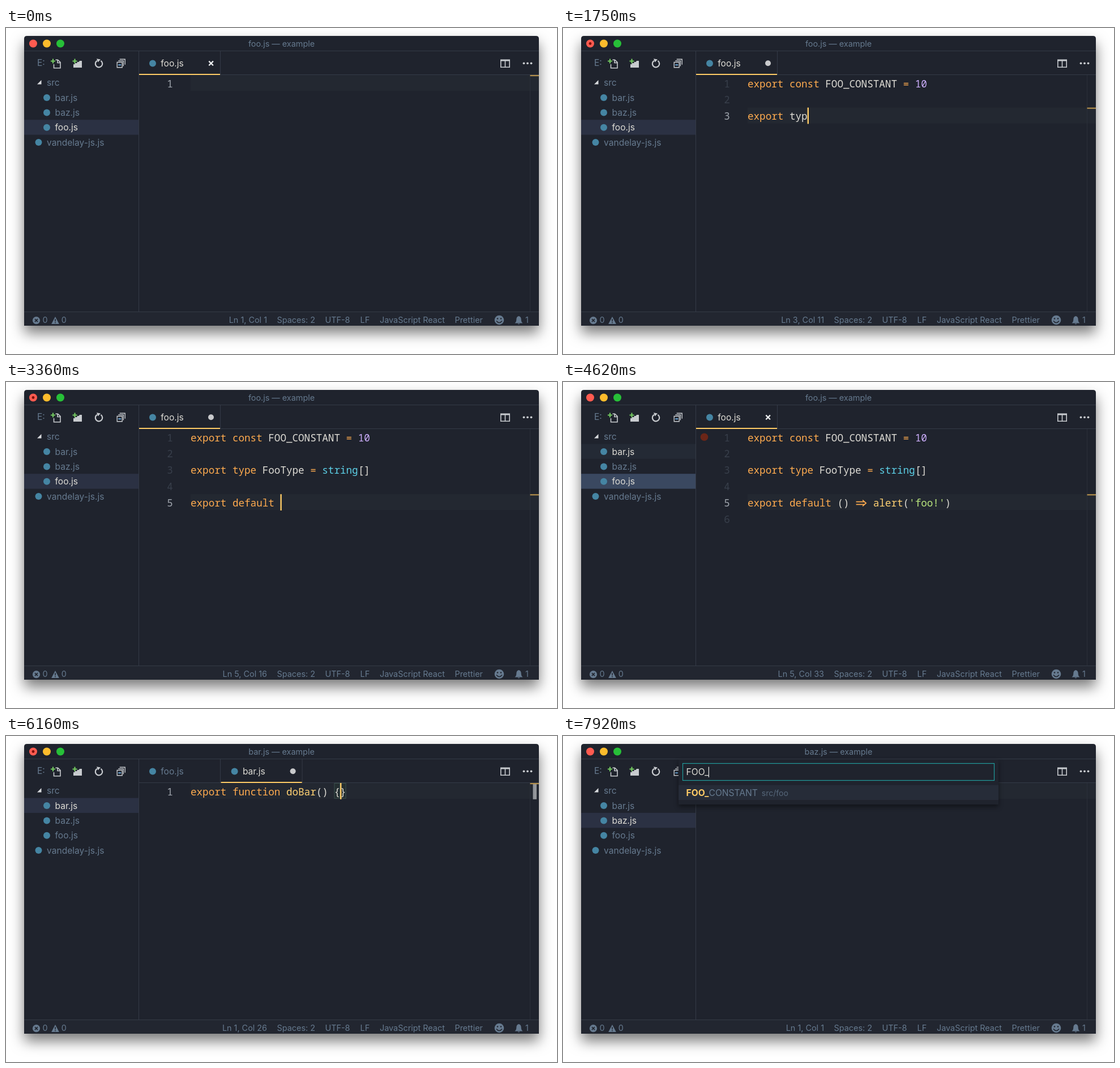
Recreate the animation shown at these times as an HTML page. Size 973 px wide and 576 px high, loop 7.99 s.

```html
<!DOCTYPE html>
<html lang="en">
<head>
<meta charset="utf-8">
<title>Editor demo</title>
<style>
  html, body { margin: 0; width: 100%; height: 100%; overflow: hidden; background: #fff; }
  svg { display: block; width: 973px; height: 576px; }
  text { font-family: Inter, "Open Sans", sans-serif; font-size: 15.6px; fill: #667a8f; white-space: pre; }
  .small { font-size: 14.4px; }
  .code { font-family: "Noto Sans Mono", "DejaVu Sans Mono", monospace; font-size: 17.6px; font-weight: 500; }
  .shadow { filter: drop-shadow(0 13px 12px rgba(0, 0, 0, .52)); }
</style>
</head>
<body>
<svg viewBox="0 0 973 576">
  <path class="shadow" d="M32 526V19q0-5 5-5H936q5 0 5 5V526z" fill="#1f232d"/>
  <g id="under"></g>
  <g id="frame"></g>
  <g id="live"></g>
</svg>
<script>
const LOOP = 7990, STEP = 70;
const CODE_X = 326, CHAR_W = 10.56, TOP = 83, LINE_H = 28.8;
const C = {
  bg: '#1f232d', dim: '#667a8f', bright: '#dedcd5', edge: '#343a46', gold: '#ffcc66',
  keyword: '#ffab4f', number: '#cfb0ff', type: '#5ccfe6', string: '#bae67e', call: '#ffd173',
  icon: '#c8cbcf', mark: '#4585a3', row: '#2b3143', focus: '#3a4860', hover: '#242a35'
};
const FOO = `export const FOO_CONSTANT = 10

export type FooType = string[]

export default () => alert('foo!`;
const BAR = 'export function doBar() {';

// [time, characters typed so far]
const FOO_KEYS = [[210, 0], [1050, 25], [2450, 59], [2730, 62], [3360, 79], [4060, FOO.length]];
const BAR_KEYS = [[5110, 0], [6160, BAR.length]];
const SAVE_FOO = 4270, OPEN_BAR = 4690, ENTER = 6300, SAVE_BAR = 6870, OPEN_BAZ = 7150, PICK = 7500;

const EXPORTS = [['doBar', 'src/bar'], ['foo', 'src/foo'], ['FOO_CONSTANT', 'src/foo'], ['FooType', 'src/foo']];

const el = id => document.getElementById(id);
const esc = s => s.replace(/&/g, '&amp;').replace(/</g, '&lt;').replace(/>/g, '&gt;');
const rect = (x, y, w, h, fill, more = '') =>
  `<rect x="${x}" y="${y}" width="${w}" height="${h}" fill="${fill}" ${more}/>`;
const dot = (x, y, r, fill) => `<circle cx="${x}" cy="${y}" r="${r}" fill="${fill}"/>`;
const line = (d, stroke, w = 1, more = '') =>
  `<path d="${d}" fill="none" stroke="${stroke}" stroke-width="${w}" ${more}/>`;
const shape = (d, fill, more = '') => `<path d="${d}" fill="${fill}" ${more}/>`;
const text = (x, y, s, fill = C.dim, more = '') =>
  `<text x="${x}" y="${y}" style="fill:${fill}" ${more}>${esc(s)}</text>`;
const small = (x, y, s, anchor = 'start') =>
  text(x, y, s, C.dim, `class="small" text-anchor="${anchor}"`);

function chrome() {
  const plus = x => line(`M${x - 4} 58.5h8m-4 -4v8`, '#73c960', 2.2);
  return [
    line('M32 40.5H941M234.5 41V501', C.edge),
    rect(32, 501.5, 909, 24.5, '#222630'),
    line('M32 501.5H941', C.edge),
    dot(48, 27.5, 7, '#ff5b50'), dot(72, 27.5, 7, '#fdbc2c'), dot(96, 27.5, 7, '#27c038'),
    // explorer actions
    text(55, 67, 'E:', C.dim, 'style="font-size:13px"'),
    line('M84.5 64v6.7h11.5v-10l-4.5 -4.5h-4M91 56.5v5h5', C.icon, 1.6), plus(83),
    shape('M119 64h2.5v-2h4v-2h3l1.5-2h4v12h-15z', C.icon), plus(121.5),
    line('M161 57.7a6.2 6.2 0 1 0 6.4 .2', C.icon, 2.2),
    shape('M160 54.2l7 1.2 -4.5 5.2z', C.icon),
    line('M196.2 60.5h9v9.3h-9zM198.3 58h9v9.5M200.7 55.3h9.5v9.5', C.icon, 1.4),
    line('M198.2 65.2h5', '#76b8ee', 1.8),
    // editor actions
    line('M873.8 57h15.4v12.3h-15.4zM881.5 57v12', C.icon, 1.6), rect(873, 55.5, 17, 3, C.icon),
    [914.5, 921, 927.5].map(x => dot(x, 62.3, 1.9, C.icon)).join(''),
    // status bar
    dot(53.5, 516.7, 6.6, C.dim), line('M51 514.2l5 5m0 -5l-5 5', '#222630', 1.7), small(64.5, 521.2, '0'),
    shape('M87 510l6.8 13H80.2z', C.dim), line('M87 514v4.5m0 1.3v1.7', '#222630', 1.6),
    small(97.7, 521.2, '0'),
    small(478.5, 521.2, 'Spaces: 2'), small(563.5, 521.2, 'UTF-8'), small(625.5, 521.2, 'LF'),
    small(660, 521.2, 'JavaScript React'), small(792.5, 521.2, 'Prettier'),
    dot(871, 516, 8.3, C.dim), dot(868, 513.5, 1.3, '#222630'), dot(874, 513.5, 1.3, '#222630'),
    line('M866 517.5q5 6.5 10 0', '#222630', 1.6),
    shape('M898.5 521.5q2.8-2 2.8-6.5q0-5 4.2-6q4.2 1 4.2 6q0 4.5 2.8 6.5zM903.5 522.3h4q-2 2.5-4 0z', C.dim),
    small(917, 521.2, '1'),
    // folder
    shape('M62.5 92v7.5h-7.5z', '#d8dadd'), text(72, 102.3, 'src')
  ].join('');
}

function typedCount(keys, t) {
  if (t <= keys[0][0]) return 0;
  for (let i = 1; i < keys.length; i++) {
    const [t0, n0] = keys[i - 1], [t1, n1] = keys[i];
    if (t <= t1) return Math.round(n0 + (n1 - n0) * (t - t0) / (t1 - t0));
  }
  return keys[keys.length - 1][1];
}

// Closers the editor inserts by itself after an opened bracket or quote.
function closers(s) {
  const pair = { '(': ')', '[': ']', '{': '}', "'": "'" }, open = [];
  for (const c of s) {
    if (open[0] === c) open.shift();
    else if (pair[c]) open.unshift(pair[c]);
  }
  return open.join('');
}

function typing(source, keys, t) {
  const n = typedCount(keys, t), lines = source.slice(0, n).split('\n');
  const last = lines.length - 1, col = lines[last].length;
  lines[last] += closers(lines[last]);
  return { n, lines, row: last, col };
}

function stateAt(t) {
  let s;
  if (t < OPEN_BAR) {
    s = typing(FOO, FOO_KEYS, t);
    if (t >= SAVE_FOO) s.lines.push('');
    return { ...s, file: 'foo.js', tabs: ['foo.js'], dirty: s.n > 0 && t < SAVE_FOO,
      caret: t >= STEP && t < 4550, focus: t >= 4620, hover: t >= 4550 ? 'bar.js' : '', hint: t >= 4480 };
  }
  if (t < OPEN_BAZ) {
    s = typing(BAR, BAR_KEYS, t);
    if (t >= SAVE_BAR) s.lines.push('');
    else if (t >= ENTER) s = { n: s.n, lines: [BAR, '  ', '}'], row: 1, col: 2 };
    return { ...s, file: 'bar.js', tabs: ['foo.js', 'bar.js'], dirty: s.n > 0 && t < SAVE_BAR,
      preview: s.n === 0, caret: t >= 5110 && t < SAVE_BAR, focus: t < 5040,
      hover: t >= 7080 ? 'baz.js' : '' };
  }
  return { n: 0, lines: [''], row: 0, col: 0, file: 'baz.js', tabs: ['foo.js', 'bar.js', 'baz.js'],
    preview: true, caret: t >= 7290 && t < PICK, focus: t < 7290, pick: t >= PICK,
    query: t < 7780 ? '' : t < 7850 ? 'F' : t < 7920 ? 'FO' : 'FOO_' };
}

function tree(s) {
  return [['bar.js', 123.3], ['baz.js', 149.6], ['foo.js', 176], ['vandelay-js.js', 202.3]].map(([name, y], i) => {
    const on = name === s.file, over = name === s.hover, x = i < 3 ? 72 : 57.5;
    const fill = on ? (s.focus ? C.focus : C.row) : over ? C.hover : '';
    return (fill ? rect(32, y - 13.8, 202, 26.4, fill) : '') +
      dot(x, y - .2, 6, C.mark) + text(x + 14.5, y + 5.2, name, on || over ? C.bright : C.dim);
  }).join('');
}

function tabs(s) {
  let out = line('M235 82.5H941', C.edge);
  s.tabs.forEach((name, i) => {
    const x = 235 + i * 144.6, on = name === s.file;
    out += line(`M${x + 143.5} 41V82`, C.edge) + dot(x + 24, 62.5, 6, C.mark) +
      text(x + 38.3, 68.3, name, on ? C.bright : C.dim, on && s.preview ? 'font-style="italic"' : '');
    if (!on) return;
    out += rect(x, 81, 143, 2, C.gold);
    out += s.dirty ? dot(x + 127, 62.3, 5, '#c9cacc')
      : line(`M${x + 123.3} 58.6l7.6 7.6m0 -7.6l-7.6 7.6`, '#eceef0', 2.3);
  });
  return out;
}

const TOKENS = /(\b(?:export|const|type|default|function)\b|=>|=)|(\bstring\b)|(\w+(?=\())|(\b\d+)|('[^']*'?)|\w+|[^\s\w=']+/g;
const TOKEN_FILL = [C.keyword, C.type, C.call, C.number, C.string];

function codeLine(src, y) {
  return [...src.matchAll(TOKENS)].map(m => {
    const x = CODE_X + m.index * CHAR_W, kind = m.slice(1).findIndex(Boolean);
    if (m[0] === '=>')
      return line(`M${x + 1.5} ${y - 8}h15M${x + 1.5} ${y - 3.4}h15M${x + 13} ${y - 11}l6 5.3l-6 5.3`, C.keyword, 1.7);
    return text(x, y, m[0], TOKEN_FILL[kind] || C.bright, 'class="code"');
  }).join('');
}

function bracketPair(src, col) {
  const open = '([{', close = ')]}';
  for (const p of [col - 1, col]) {
    const c = src[p] || ' ', dir = open.includes(c) ? 1 : close.includes(c) ? -1 : 0;
    for (let q = p, depth = 0; dir && q >= 0 && q < src.length; q += dir) {
      if (open.includes(src[q])) depth++;
      if (close.includes(src[q])) depth--;
      if (!depth) return [p, q];
    }
  }
  return null;
}

function editor(s) {
  const y = TOP + s.row * LINE_H, pair = s.caret && bracketPair(s.lines[s.row], s.col);
  let out = rect(CODE_X, y, 615, LINE_H - .8, '#232831') + line('M925.5 83V501', '#2a2f3a');
  if (pair) {
    for (const p of pair)
      out += rect(CODE_X + p * CHAR_W + .5, y + .5, CHAR_W - 1, LINE_H - 2, '#242e31', 'stroke="#3c504c"');
    out += rect(930.5, y, 6.5, LINE_H, '#92959a');
  }
  s.lines.forEach((src, i) => {
    const base = 104.5 + i * LINE_H;
    out += text(294.8, base, String(i + 1), i === s.row ? '#a0a6ae' : '#383f4b', 'class="code" text-anchor="end"');
    out += codeLine(src, base);
  });
  if (!s.pick) out += rect(925.5, y, 15.5, 2.2, '#b38f4b');
  if (s.hint) out += dot(249.5, 97.3, 6.8, '#6b2618');
  if (s.caret) out += rect(CODE_X + s.col * CHAR_W, y, 2.4, LINE_H, C.gold);
  return out;
}

function picker(s) {
  const q = s.query, rows = EXPORTS.filter(([name]) => name.toLowerCase().startsWith(q.toLowerCase()));
  const h = 80 + (rows.length - 1) * 26.4;
  let out = rect(204, 41, 565, h, C.bg, 'style="filter:drop-shadow(0 4px 4px rgba(0,0,0,.45))"') +
    rect(211.5, 48.5, 550, 30, C.bg, 'stroke="#209c9c" stroke-width="1.2"') +
    text(217.5, 69.3, q, C.bright);
  out += rect(q ? 217.5 + [0, 9.8, 21.5, 0, 39.3][q.length] : 217.5, 54.5, 1.2, 18.5, '#e4e5e6');
  rows.forEach(([name, path], i) => {
    const y = 86.7 + i * 26.4;
    if (!i) out += rect(204, y, 565, 26.4, '#262c38');
    out += `<text x="217.5" y="${y + 18.9}"><tspan style="fill:${C.gold}" font-weight="700">${name.slice(0, q.length)}</tspan>` +
      `${name.slice(q.length)}<tspan dx="7" style="fill:#56677a;font-size:14px">${path}</tspan></text>`;
  });
  return out;
}

function draw(t) {
  const s = stateAt(t);
  el('under').innerHTML = tree(s) + tabs(s) + editor(s);
  el('live').innerHTML =
    text(486.5, 32.6, s.file + ' — example', C.dim, 'class="small" text-anchor="middle"') +
    small(461, 521.2, `Ln ${s.row + 1}, Col ${s.col + 1}`, 'end') +
    (s.dirty ? dot(48, 27.5, 2.4, '#7d100b') : '') +
    (s.pick ? picker(s) : '');
}

// The picture holds still between 6370 and 6870.
function stepTime(t) {
  return t < 6870 ? Math.min(Math.floor(t / STEP) * STEP, 6370) : 6870 + Math.floor((t - 6870) / STEP) * STEP;
}

let shown = -1;
function tick() {
  const t = stepTime(performance.now() % LOOP);
  if (t !== shown) draw(shown = t);
  requestAnimationFrame(tick);
}
el('frame').innerHTML = chrome();
tick();
</script>
</body>
</html>
```
